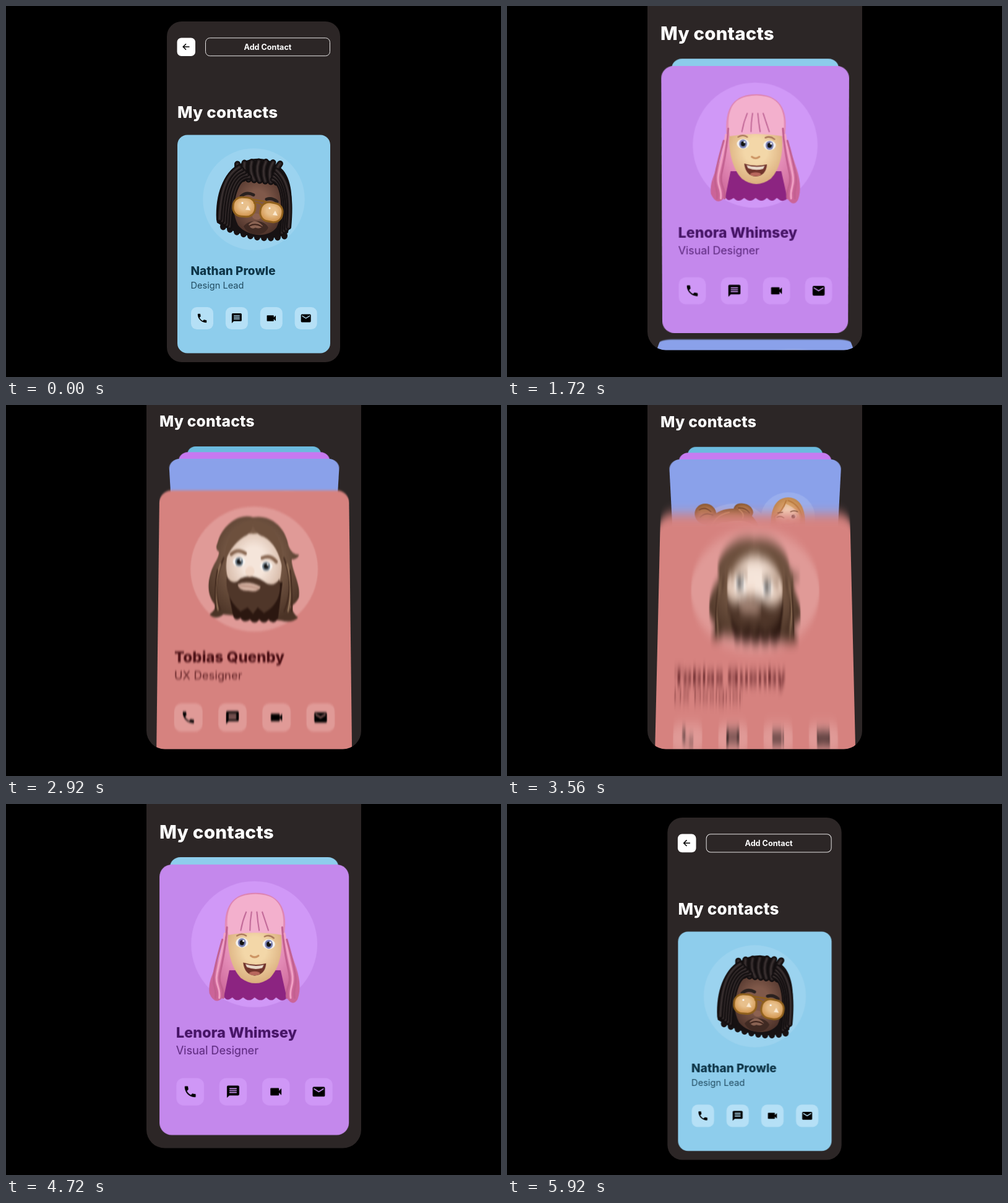
Recreate the animation shown at these times as an HTML page. Size 800 px wide and 600 px high, loop 5960 ms.

```html
<!DOCTYPE html>
<html lang="en">
<head>
<meta charset="utf-8">
<title>My contacts</title>
<style>
  html, body { margin: 0; width: 100%; height: 100%; overflow: hidden; background: #000; }
  #phone {
    position: absolute; left: 0; top: 0; width: 280px; height: 550.5px;
    border-radius: 24px; background: #2c2626; overflow: hidden;
    transform-origin: 0 0; perspective: 1388px; perspective-origin: 50% 425px;
  }
  #phone > * { position: absolute; }
  #header { left: 0; top: 0; }
  #title {
    left: 17px; top: 127px; white-space: nowrap; color: #fff;
    font: 800 26px/40px Inter, sans-serif; letter-spacing: .2px; transform-origin: 0 50%;
  }
  .card {
    left: 16.5px; top: 0; width: 247px; height: 353px;
    border-radius: 16px; overflow: hidden; transform-origin: 50% 0;
  }
  svg { display: block; }
  text { font-family: Inter, sans-serif; }
</style>
</head>
<body>
<svg width="0" height="0" style="position:absolute">
  <defs id="defs">
    <filter id="streak" x="-5%" y="-10%" width="110%" height="120%" color-interpolation-filters="sRGB">
      <feGaussianBlur id="streakBlur" stdDeviation="0 0"/>
    </filter>
  </defs>
</svg>
<div id="phone">
  <svg id="header" width="280" height="100">
    <rect x="16.5" y="26.5" width="29.5" height="29.5" rx="7" fill="#fff"/>
    <path d="M36.5 41H26.5M31 36.2L26.2 41L31 45.8" fill="none" stroke="#000" stroke-width="1.5"/>
    <rect x="62.5" y="26.7" width="201" height="29" rx="7" fill="none" stroke="#e6e4e4"/>
    <text x="163" y="46" text-anchor="middle" font-size="12.6" font-weight="700" fill="#fff">Add Contact</text>
  </svg>
  <div id="title">My contacts</div>
</div>
<script>
const $ = id => document.getElementById(id);
const range = n => [...Array(n).keys()];

// ---- drawing helpers ----
const gradient = (id, inner, outer) => `<radialGradient id="${id}" cx=".5" cy=".42" r=".62">
  <stop offset=".35" stop-color="${inner}"/><stop offset="1" stop-color="${outer}"/></radialGradient>`;
const shape = (d, fill, extra = '') => `<path d="${d}" fill="${fill}" ${extra}/>`;
const line = (d, color, width) =>
  `<path d="${d}" fill="none" stroke="${color}" stroke-width="${width}" stroke-linecap="round" stroke-linejoin="round"/>`;
const oval = (x, y, rx, ry, fill, turn = 0) =>
  `<ellipse cx="${x}" cy="${y}" rx="${rx}" ry="${ry}" fill="${fill}" transform="rotate(${turn} ${x} ${y})"/>`;
const lock = (d, width, dark, mid, light) =>
  line(d, dark, width) + line(d, mid, width * .6) + line(d, light, width * .25);
const eye = (x, y, r, iris) => oval(x, y, r * 1.25, r, '#f6f3f0') + oval(x, y, r * .8, r * .9, iris) +
  oval(x, y, r * .45, r * .5, '#111') + oval(x + r * .3, y - r * .35, r * .2, r * .2, '#fff');
const label = (y, size, weight, fill, text) =>
  `<text x="21.5" y="${y}" font-size="${size}" font-weight="${weight}" fill="${fill}">${text}</text>`;

$('defs').innerHTML +=
  gradient('brownSkin', '#80594a', '#4a3028') + gradient('goldSkin', '#f3d7a8', '#d8aa79') +
  gradient('paleSkin', '#f5e5da', '#cfaf9b') + gradient('peachSkin', '#f7dcc0', '#cc9768') +
  gradient('pinkHair', '#f0a0c6', '#cb6498') + gradient('oakHair', '#80614c', '#4b3326') +
  gradient('auburnHair', '#a66f3f', '#6b4020') + gradient('honeyHair', '#d9a267', '#a86c35') +
  gradient('lens', '#e8c08c', '#cf8f45');

// ---- avatars ----
function dreadlocks() {
  const strand = (d, w) => lock(d, w, '#120e0f', '#231c1d', '#3a3131');
  return shape('M63 137C61 96 74 62 98 50C112 35 146 34 160 49C182 58 188 96 183 122L179 158C160 174 104 168 64 142Z', '#171213') +
    range(10).map(i => oval(74 + i * 11, 148 + 18 * Math.sin(i * .24), 5, 6, '#171213')).join('') +
    shape('M92 92C96 70 130 66 161 80C173 100 170 130 160 150C146 168 112 164 98 146C90 130 88 108 92 92Z', 'url(#brownSkin)') +
    range(7).map(i => strand(`M${106 + i * 9} ${71 + i}Q${96 + i * 10} 58 ${97 + i * 11.5} ${47 - 4 * Math.sin(i / 2)}`, 10)).join('') +
    range(5).map(i => strand(`M${116 - i * 4} ${68 - i * 4}C${96 - i * 5} 66 ${86 - i * 4} 96 ${84 - i * 4} ${148 - i * 3}`, 9)).join('') +
    range(4).map(i => strand(`M${154 + i * 2} ${72 - i * 5}C${170 + i * 4} 76 ${176 + i * 2.5} 110 ${169 + i * 3.6} ${158 - i * 3}`, 8.5)).join('') +
    line('M103 99Q112 91 123 97M144 104Q153 101 161 108', '#2a211f', 5) +
    shape('M107 148C115 136 141 136 147 150C140 165 116 165 107 148Z', '#402a23') +
    shape('M115 145Q126 133 138 147Q134 153 126 150Q119 154 115 145Z', '#8a6353') +
    line('M117 147Q126 142 136 148', '#3a2019', 2) +
    oval(128, 132, 7, 5, '#8d6251', 8) +
    [[108, 116, 4], [152, 124.5, 10]].map(([x, y, a]) =>
      `<rect x="${x - 18}" y="${y - 15}" width="36" height="31" rx="14" transform="rotate(${a} ${x} ${y})" fill="url(#lens)" stroke="#8f601d" stroke-width="3"/>` +
      shape(`M${x + 2} ${y + 5}l4 -7 4 8z`, '#fbe9d0') + oval(x - 3, y - 6, 1.5, 1.5, '#fff')).join('') +
    line('M124 110Q131 108 137 114M120 104L144 108', '#8f601d', 2.4);
}

function longPinkHair() {
  return shape('M86 92C82 54 96 37 125 37C154 37 168 56 163 90C166 104 172 114 176 128C183 146 185 164 180 176Q174 186 166 174L82 174Q72 184 65 168C63 148 74 136 78 120C82 108 84 100 86 92Z', 'url(#pinkHair)') +
    shape('M91 138H158L166 174Q160 181 152 173Q146 181 139 173Q132 181 124 173Q117 181 109 173Q101 181 95 173Q88 180 84 172Z', '#8c2481') +
    shape('M90 88C92 76 154 76 158 88C162 112 156 136 144 148Q125 162 106 148C94 136 87 110 90 88Z', 'url(#goldSkin)') +
    shape('M90 92C85 62 92 44 112 40Q125 37 138 40C158 44 165 64 160 92Q124 86 90 92Z', '#f3b0cd') +
    range(4).map(i => line(`M${113 + i * 7} 62Q${108 + i * 10} 74 ${106 + i * 12} 86`, '#bf6696', 1.6)).join('') +
    range(3).map(i => line(`M${88 - i * 3} ${82 + i * 8}C${86 - i * 4} 112 ${82 - i * 4} 126 ${79 - i * 4} 142S${85 - i * 5} 160 ${83 - i * 5} 174` +
      `M${160 + i * 3} ${82 + i * 8}C${162 + i * 4} 112 ${166 + i * 4} 126 ${169 + i * 4} 142S${164 + i * 5} 160 ${166 + i * 5} 174`, i % 2 ? '#f2a3c6' : '#c2608f', 2.5)).join('') +
    line('M101 93Q107 89 113 93M137 94Q143 91 149 96', '#a9785a', 2) +
    eye(107.5, 102, 6.5, '#777fb4') + eye(142.5, 104, 6.5, '#777fb4') +
    line('M119 119Q124 123 129 119', '#cc9463', 2.5) +
    shape('M109 128Q124 133 139 129Q138 144 124 145Q111 144 109 128Z', '#71342c') +
    shape('M112 130Q124 134 136 131L134 135Q124 138 114 134Z', '#e9d9ca') + oval(124, 142, 7, 2.5, '#b8675c');
}

function beardedMan() {
  return shape('M76 70C82 46 104 30 122 36C144 32 164 48 168 74Q172 86 182 86Q178 92 172 92C172 108 184 124 181 142Q177 150 170 154Q176 166 180 168Q172 176 158 172L84 164Q74 172 66 164Q74 158 74 152C62 140 62 118 72 98Q78 88 78 82Q72 78 76 70Z', 'url(#oakHair)') +
    shape('M88 122H160L154 170Q148 178 142 171Q136 178 130 171Q124 178 118 171Q110 176 106 169Q98 174 96 164Z', '#2b1710') +
    shape('M88 92C90 68 108 56 122 58C146 54 160 74 159 100C158 130 148 146 124 148C98 146 84 118 88 92Z', 'url(#paleSkin)') +
    shape('M121 39C100 44 86 60 84 100Q92 74 110 62Q124 56 121 39C142 42 164 60 160 104Q154 72 136 62Q122 58 121 39Z', '#6d503d') +
    range(3).map(i => line(`M${84 - i * 4} ${90 + i * 8}Q${68 + i * 2} 128 ${80 - i * 3} 158M${162 + i * 4} ${90 + i * 8}Q${176 - i * 2} 128 ${162 + i * 5} 160`, i % 2 ? '#93745a' : '#442c20', 2)).join('') +
    shape('M88 114Q96 128 106 117Q120 110 136 121Q148 130 156 118C160 142 148 156 136 162L128 155L122 163L115 155L106 160C92 148 86 132 88 114Z', '#4f3629') +
    line('M94 85Q102 77 112 84M134 90Q145 85 152 95', '#84624c', 4.5) +
    eye(104, 95, 6.5, '#6e7c88') + eye(139, 101, 6.5, '#6e7c88') +
    oval(118, 108, 6, 7, '#f1d9c9', 8) +
    shape('M102 125Q116 119 132 128Q128 136 116 133Q105 134 102 125Z', '#d8b5a5') +
    line('M104 127Q116 126 129 130', '#986b5c', 1.2);
}

function teamFaces() {
  const big = oval(50, 86, 16, 17, 'url(#auburnHair)') + oval(106, 81, 15, 12, 'url(#auburnHair)', 25) +
    line('M41 79Q50 73 58 82M42 91Q50 82 62 88M99 76Q110 75 115 84', '#6a4020', 2) +
    shape('M47 132C44 96 66 76 92 77C120 78 134 104 131 132Z', 'url(#auburnHair)') +
    shape('M51 122C62 112 62 98 82 99C102 93 120 99 130 112C134 142 130 160 116 170C98 180 72 172 60 156Q48 150 47 134Q46 124 51 122Z', 'url(#peachSkin)') +
    line('M57 112Q62 88 85 83M105 93Q108 84 100 79', '#c08855', 2) +
    line('M73 121Q82 114 94 119M115 118Q121 114 127 117', '#79502f', 2) +
    eye(83, 132, 6, '#5b3a20') + eye(121, 129, 5.5, '#5b3a20') +
    line('M73 129Q83 121 92 129M114 126Q121 120 128 125', '#20130d', 1.8) +
    oval(108, 144, 6, 5, '#efc9a6') + line('M103 147Q108 150 113 146', '#c18c60', 1.6) +
    shape('M93 153Q106 157 119 152Q117 164 106 164Q97 163 93 153Z', '#a23b3b') +
    shape('M96 155Q106 158 117 154L114 158Q106 161 99 158Z', '#fff') +
    shape('M56 153l4 8-4 5-4-5z', '#d6922f');
  const winking = shape('M147 118C146 92 146 60 172 59C196 60 200 92 197 116Q190 120 182 117L158 120Z', 'url(#honeyHair)') +
    shape('M154 88C160 82 166 74 168 69Q188 78 190 92C190 108 184 118 172 118C160 117 154 104 154 88Z', 'url(#peachSkin)') +
    line('M169 64Q164 82 152 90L151 114M172 64Q188 70 193 90L194 112', '#b97a3e', 2) +
    line('M156 91Q161 88 166 92M157 84L164 83M176 82Q181 79 186 82', '#5a391d', 1.6) +
    eye(180, 90, 3.6, '#4b3522') + oval(172, 97, 3, 2.5, '#efc7a3') +
    shape('M163 102Q172 105 183 101Q181 112 172 113Q164 112 163 102Z', '#70282a') +
    shape('M164 103Q172 106 182 102L180 105Q172 108 166 105Z', '#fff') + oval(172, 111, 5, 5.5, '#ee8588');
  const green = oval(159, 152, 15.5, 17.5, 'url(#peachSkin)', -8) +
    shape('M143 147C140 136 148 131 156 134Q166 129 171 138Q175 142 174 150Q169 143 160 143Q150 143 147 151Z', '#78b84b') +
    line('M148 141Q154 135 164 139', '#a4da75', 2) +
    line('M148 147L154 146M161 145L167 145', '#7d7142', 1.3) +
    eye(152, 151, 2.5, '#475f48') + eye(164, 149.5, 2.5, '#475f48') +
    line('M154 160Q160 158 165 158', '#8371ae', 2.4);
  return big + winking + green;
}

// ---- cards ----
const glyphs = [
  'M6.6 10.8c1.4 2.8 3.8 5.1 6.6 6.6l2.2-2.2c.3-.3.7-.4 1-.2 1.1.4 2.3.6 3.6.6.6 0 1 .4 1 1V20c0 .6-.4 1-1 1C10.6 21 3 13.4 3 4c0-.6.4-1 1-1h3.5c.6 0 1 .4 1 1 0 1.3.2 2.5.6 3.6.1.4 0 .7-.3 1z',
  'M20 2H4a2 2 0 0 0-2 2v18l4-4h14a2 2 0 0 0 2-2V4a2 2 0 0 0-2-2zM6 6h12v1.7H6zm0 3.2h12v1.7H6zm0 3.2h12v1.7H6z',
  'M17 10.5V7a1 1 0 0 0-1-1H4a1 1 0 0 0-1 1v10a1 1 0 0 0 1 1h12a1 1 0 0 0 1-1v-3.5l4 4v-11z',
  'M20 4H4a2 2 0 0 0-2 2v12a2 2 0 0 0 2 2h16a2 2 0 0 0 2-2V6a2 2 0 0 0-2-2zm0 4l-8 5-8-5V6l8 5 8-5z'
];

const contacts = [
  { name: 'Nathan Prowle', role: 'Design Lead', avatar: dreadlocks, color: '#8ecdec', deep: '#6cbade', ink: '#0e3548', halo: '#9bd3ef', pad: '#b5e0f6' },
  { name: 'Lenora Whimsey', role: 'Visual Designer', avatar: longPinkHair, color: '#c488ec', deep: '#c678f2', ink: '#451365', halo: '#d098f7', pad: '#cf97f6' },
  { name: 'Business Team', role: 'View team', avatar: teamFaces, color: '#8aa1ea', deep: '#8aa1ea', ink: '#1c1060', halo: '#99aeed', pad: '#9fb2f0', team: true },
  { name: 'Tobias Quenby', role: 'UX Designer', avatar: beardedMan, color: '#d6827f', deep: '#d6827f', ink: '#4a0f14', halo: '#e09a97', pad: '#e09a97' }
];

function actions({ team, pad }) {
  return glyphs.map((d, i) => {
    const muted = team && i < 3;
    const x = 22 + i * 55.9;
    const box = muted ? 'fill="none" stroke="#adbdf1" stroke-width=".8"' : `fill="${pad}"`;
    return `<rect x="${x}" y="278.5" width="36" height="36" rx="9.5" ${box}/>` +
      shape(d, muted ? '#b9c7f3' : '#000', `fill-rule="evenodd" transform="translate(${x + 8.4} 286.9) scale(.8)"`);
  }).join('');
}

function cardMarkup(c) {
  const halo = c.team
    ? oval(92.8, 126, 57, 57, c.halo) + oval(172, 91, 40, 40, c.halo) + oval(160.6, 153.4, 29, 29, c.halo)
    : oval(123.5, 104, 82.3, 82.3, c.halo);
  const text = c.team
    ? label(231.5, 19, 800, c.ink, c.name) + label(254, 12.3, 800, c.ink, c.role)
    : label(226.3, 19, 800, c.ink, c.name) + `<g opacity=".85">${label(248, 14.6, 400, c.ink, c.role)}</g>`;
  return `<svg width="247" height="353">${halo}${c.avatar()}${text}${actions(c)}</svg>`;
}

const phone = $('phone');
const cards = contacts.map(c => {
  const card = document.createElement('div');
  card.className = 'card';
  card.innerHTML = cardMarkup(c);
  phone.append(card);
  return card;
});

// ---- motion ----
const LOOP = 5960;
const ENTER = [686, 1635, 2553], ENTER_TIME = 560;
const LEAVE = [5058, 4270, 3470], LEAVE_TIME = 420;
const TRAVEL = 383;

// cubic-bezier(.4, 0, .2, 1)
function ease(x) {
  if (x <= 0) return 0;
  if (x >= 1) return 1;
  let lo = 0, hi = 1;
  for (let i = 0; i < 24; i++) {
    const m = (lo + hi) / 2, n = 1 - m;
    if (1.2 * m * n * n + .6 * m * m * n + m * m * m < x) lo = m; else hi = m;
  }
  return lo * lo * (3 - 2 * lo);
}

// 0 = below the screen, 1 = fully in place
const shown = (i, t) => i === 0 ? 1 :
  ease((t - ENTER[i - 1]) / ENTER_TIME) - ease((t - LEAVE[i - 1]) / LEAVE_TIME);

function render(t) {
  const zoom = ease((t - 310) / 300) - ease((t - 5745) / 215);
  const scale = 1 + 67 / 280 * zoom;
  const bottom = 575.5 - 19.5 * zoom;
  phone.style.transform = `translate(${260 - 33 * zoom}px, ${bottom - 550.5 * scale}px) scale(${scale})`;

  let depth = 0;
  for (let i = cards.length - 1; i >= 0; i--) {
    const { style } = cards[i], { color, deep } = contacts[i];
    const u = shown(i, t), hidden = 1 - u;
    const lift = i === 0 ? 2.7 * Math.max(0, 1 - depth) : 0;
    const top = 180.8 - 10 * depth + .5 * depth * depth + lift + TRAVEL * hidden;
    const size = 1 - .109 * depth + .0033 * depth * depth;
    const tilt = 87 * hidden - 40 * Math.min(depth, 1);
    const fade = 100 * Math.min(1, Math.max(0, depth - 1));
    style.display = u < .001 ? 'none' : 'block';
    style.transform = `translateY(${top}px) scale(${size}) rotateX(${tilt}deg)`;
    style.background = `color-mix(in srgb, ${color}, ${deep} ${fade}%)`;

    // vertical motion blur, proportional to speed in px per ms
    const speed = Math.abs(shown(i, t + 10) - shown(i, t - 10)) * TRAVEL / 20;
    const moving = u > .001 && hidden > .004 && speed > .1;
    style.filter = moving ? 'url(#streak)' : 'none';
    if (moving) $('streakBlur').setAttribute('stdDeviation', `0 ${Math.min(8, speed * 4.5)}`);
    if (i > 0) depth += u;
  }
  $('title').style.transform = `translateY(${-8.07 * depth}px) scale(${1 - .081 * depth})`;
}

const start = performance.now();
function frame() {
  render((performance.now() - start) % LOOP);
  requestAnimationFrame(frame);
}
frame();
</script>
</body>
</html>
```
